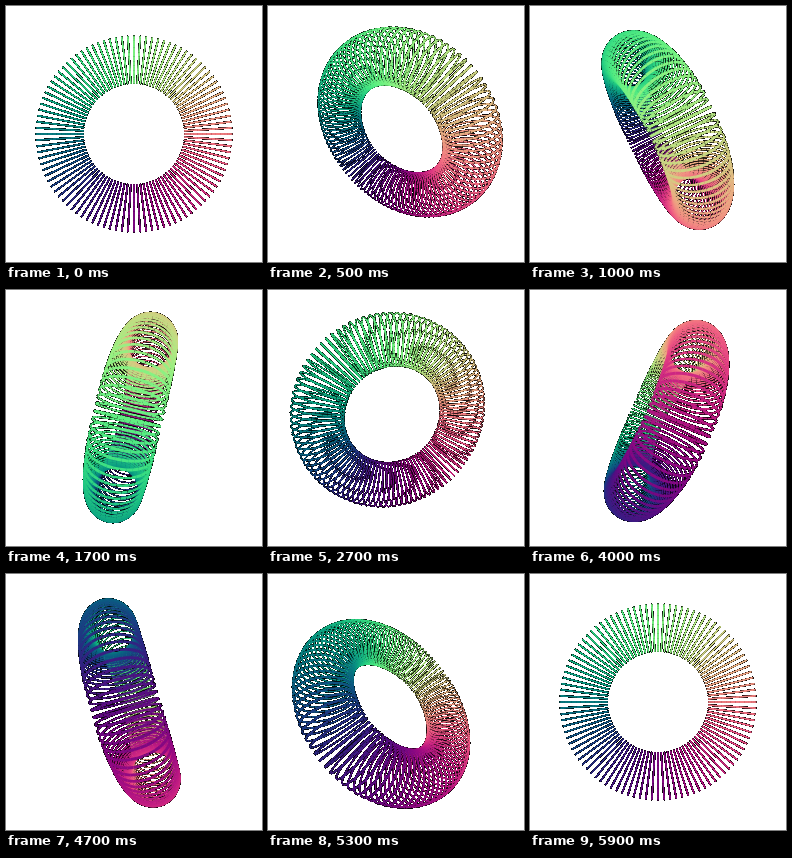
Animation, 256 px wide and 256 px high, one loop 6000 ms. Source, as an HTML page with a canvas:

```html
<!DOCTYPE html>
<html>
<head>
<meta charset="utf-8">
<style>
html, body { margin: 0; width: 100%; height: 100%; overflow: hidden; background: #fff; }
canvas { display: block; width: 256px; height: 256px; image-rendering: pixelated; }
</style>
</head>
<body>
<canvas id="stage" width="256" height="256"></canvas>
<script>
const SIZE = 256, MID = SIZE / 2, TAU = 2 * Math.PI;
const ctx = document.getElementById('stage').getContext('2d', { willReadFrequently: true });
const RINGS = 100, SIDES = 36, STEPS = 60, STEP_MS = 100;
const MAJOR = 73.5, MINOR = 22.9, DIST = 221.7;
const LINE = 1.75, CUTOFF = 0.35;

// A torus made of separate hoops, tinted by their direction from the centre.
const rings = Array.from({ length: RINGS }, (_, i) => {
  const phi = TAU * i / RINGS, x = Math.cos(phi), y = Math.sin(phi);
  const tint = v => Math.round(255 * (0.49 + 0.46 * v));
  const points = Array.from({ length: SIDES }, (_, j) => {
    const th = TAU * j / SIDES, r = MAJOR + MINOR * Math.cos(th);
    return [r * x, r * y, MINOR * Math.sin(th)];
  });
  return { color: `rgb(${tint(x)},${tint(y)},130)`, points };
});

// Camera orbit: azimuth and elevation both equal a, with y kept upright.
function camera(a) {
  const s = Math.sin(a), c = Math.cos(a), k = Math.sign(c);
  return {
    right: [k * c, 0, -k * s],
    up: [-k * s * s, k * c, -k * s * c],
    toward: [s * c, s, c * c]
  };
}

const dot = (p, q) => p[0] * q[0] + p[1] * q[1] + p[2] * q[2];

// Hard cut-out: thin coverage turns white, partly covered edges turn dark.
function hardenEdges() {
  const image = ctx.getImageData(0, 0, SIZE, SIZE), px = image.data;
  for (let i = 0; i < px.length; i += 4) {
    const alpha = px[i + 3] / 255;
    for (let k = i; k < i + 3; k++) px[k] = alpha < CUTOFF ? 255 : px[k] * alpha ** 3;
    px[i + 3] = 255;
  }
  ctx.putImageData(image, 0, 0);
}

function draw(step) {
  const cam = camera(TAU * step / (STEPS - 1));
  const project = p => {
    const z = dot(p, cam.toward), scale = DIST / (DIST - z);
    return { x: MID + dot(p, cam.right) * scale, y: MID - dot(p, cam.up) * scale, z, scale };
  };
  const parts = [];
  for (const { color, points } of rings) {
    const flat = points.map(project);
    flat.forEach((p, j) => {
      const q = flat[(j + 1) % SIDES];
      parts.push({ p, q, color, z: p.z + q.z });
    });
  }
  parts.sort((m, n) => m.z - n.z);
  ctx.clearRect(0, 0, SIZE, SIZE);
  for (const { p, q, color } of parts) {
    ctx.lineWidth = LINE * p.scale;
    ctx.strokeStyle = color;
    ctx.beginPath();
    ctx.moveTo(p.x, p.y);
    ctx.lineTo(q.x, q.y);
    ctx.stroke();
  }
  hardenEdges();
}

let shown = -1;
function tick(now) {
  const step = Math.floor(now / STEP_MS) % STEPS;
  if (step !== shown) draw(shown = step);
  requestAnimationFrame(tick);
}
draw(0);
requestAnimationFrame(tick);
</script>
</body>
</html>
```
